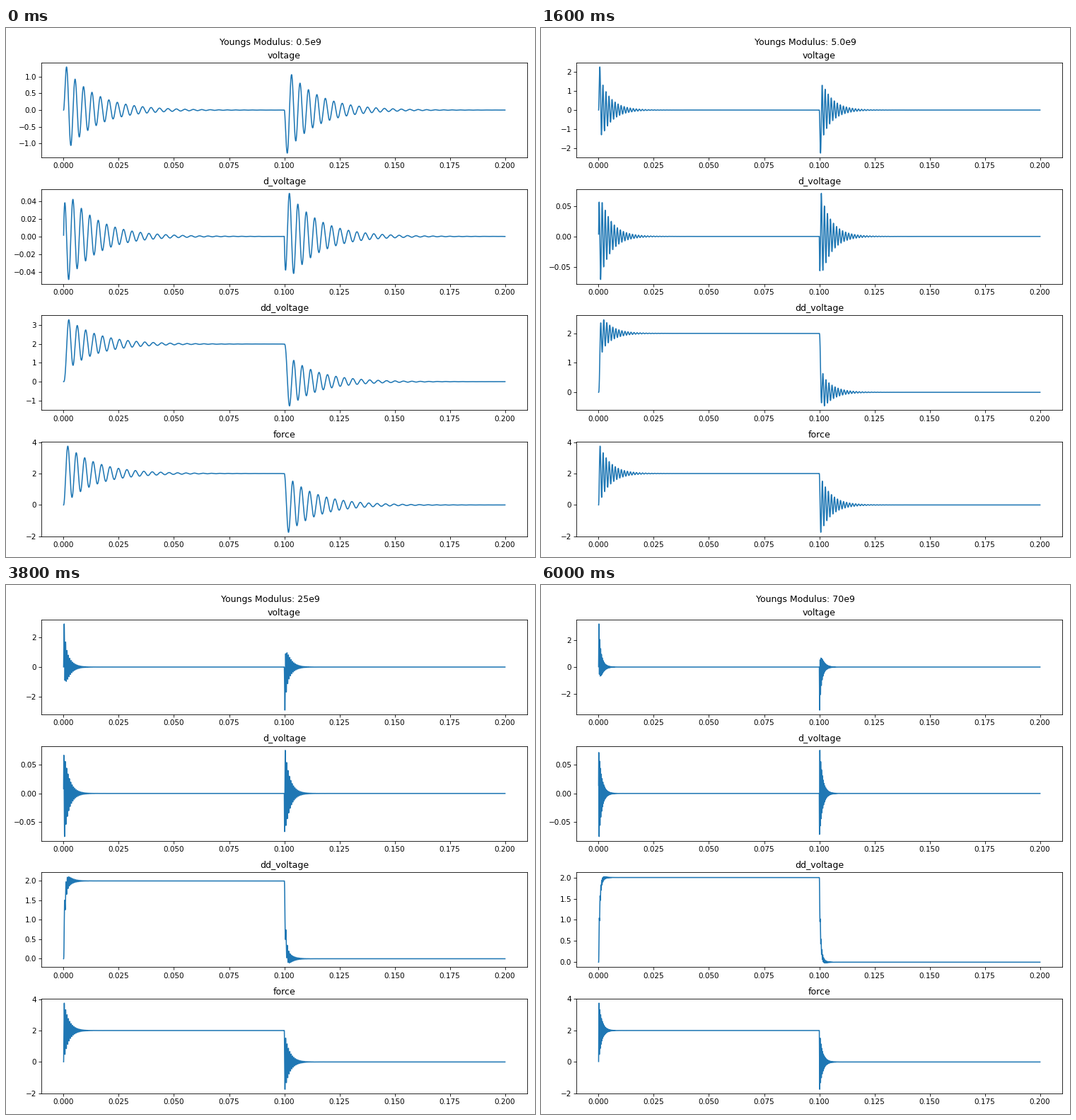
Recreate the animation shown at these times as a matplotlib script. Size 748 by 748 pixels, loop 6.2 s.

```python
import numpy as np
import matplotlib.pyplot as plt
from matplotlib.animation import FuncAnimation

DT, N = 1e-5, 20000        # sample step and count
LOAD = 2.0                 # load held during the first half
ZETA = 0.044               # damping ratio
TAU = 0.53e-3              # time constant of the electric circuit
RATE_GAIN = 0.0423

MODULI = np.concatenate([
    np.arange(0.5, 4.1, 0.5),
    np.arange(5, 10),
    np.arange(10, 35.1, 2.5),
    np.arange(40, 71, 5),
])

time = np.arange(N) * DT


def release(step):
    """Take the load away halfway through."""
    out = step.copy()
    out[N // 2:] -= step[:N // 2]
    return out


def simulate(modulus):
    """Ringing force, its low-passed level, the difference and its rate."""
    omega = 1e3 * np.sqrt(4.054 * modulus + 0.675)
    damped = omega * np.sqrt(1 - ZETA ** 2)
    pole = -ZETA * omega + 1j * damped
    amp = LOAD * (1 - 1j * ZETA * omega / damped)

    t = time + DT
    ring = amp * np.exp(pole * t)
    fade = np.exp(-t / TAU)
    force = LOAD - ring.real
    level = LOAD * (1 - fade) - ((ring - amp * fade) / (1 + pole * TAU)).real
    volt = force - level
    rate = RATE_GAIN / omega * (-(pole * ring).real - volt / TAU)
    return [release(v) for v in (volt, rate, level, force)]


def label(modulus):
    number = f"{modulus:.1f}" if modulus < 10 else f"{modulus:g}"
    return f"Youngs Modulus: {number}e9"


plt.rcParams["font.family"] = "DejaVu Sans"
fig, axes = plt.subplots(4, 1, figsize=(10, 10), dpi=74.8)
heading = fig.suptitle("", y=0.9813)
rows = dict(top=1 - 49 / 748, bottom=1 - 719.2 / 748, hspace=0.3335)
fig.subplots_adjust(**rows)

lines = []
for ax, name in zip(axes, ("voltage", "d_voltage", "dd_voltage", "force")):
    ax.set_title(name)
    lines += ax.plot(time, np.zeros(N))


def draw(i):
    heading.set_text(label(MODULI[i]))
    for ax, line, values in zip(axes, lines, simulate(MODULI[i])):
        line.set_ydata(values)
        ax.relim()
        ax.autoscale_view()
    # the left margin follows the widest tick label
    fig.tight_layout()
    fig.subplots_adjust(**rows)
    return lines


anim = FuncAnimation(fig, draw, frames=len(MODULI), interval=200, repeat=True)
plt.show()
```
